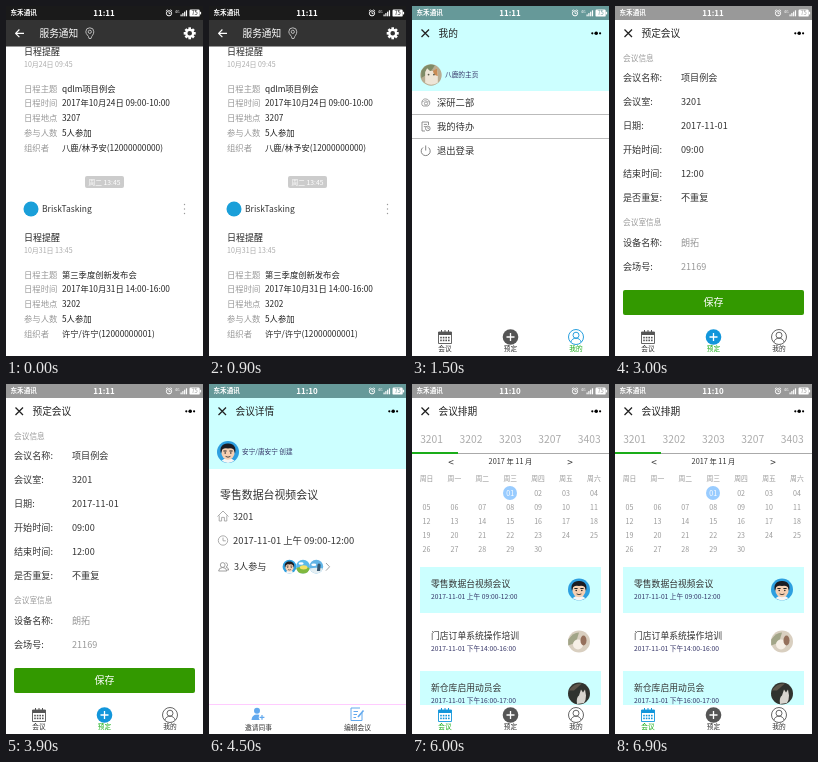
Animation of 197x350 px, one loop 7.5 s. Source, as an HTML page:

```html
<!DOCTYPE html>
<html lang="zh-CN">
<head>
<meta charset="utf-8">
<title>会议助手</title>
<style>
html, body { margin: 0; width: 100%; height: 100%; overflow: hidden; background: #fff; }
svg { display: block; width: 100%; height: 100%; }
text { font-family: "Noto Sans CJK SC", "Noto Sans CJK JP", "Noto Sans CJK", "Noto Sans", sans-serif; white-space: pre; }
</style>
</head>
<body>
<svg id="stage" viewBox="0 0 197 350" xmlns="http://www.w3.org/2000/svg"></svg>
<script>
const SCENE_MS = 1500;
const CYAN = '#ccffff', BLUE = '#1296db', GREEN = '#1aad19', INK = '#333', GREY = '#999';

// Text is placed by the vertical middle of its line.
const text = (x, y, s, size = 9, fill = INK, weight = 400, anchor = 'start') =>
  `<text x="${x}" y="${(y + size * 0.37).toFixed(2)}" font-size="${size}" fill="${fill}" text-anchor="${anchor}" font-weight="${weight}">${s}</text>`;
const mid = (x, y, s, size, fill, weight) => text(x, y, s, size, fill, weight, 'middle');
const rect = (x, y, w, h, fill, rx = 0) =>
  `<rect x="${x}" y="${y}" width="${w}" height="${h}" fill="${fill}" rx="${rx}"/>`;
const disc = (x, y, r, fill) => `<circle cx="${x}" cy="${y}" r="${r}" fill="${fill}"/>`;
const oval = (x, y, rx, ry, fill) => `<ellipse cx="${x}" cy="${y}" rx="${rx}" ry="${ry}" fill="${fill}"/>`;
const ring = (x, y, r, color, w = 0.8) =>
  `<circle cx="${x}" cy="${y}" r="${r}" fill="none" stroke="${color}" stroke-width="${w}"/>`;
const line = (d, color, w = 0.8) =>
  `<path d="${d}" fill="none" stroke="${color}" stroke-width="${w}" stroke-linejoin="round"/>`;
const shape = (d, fill) => `<path d="${d}" fill="${fill}"/>`;
const at = (x, y, body, scale = 1) => `<g transform="translate(${x} ${y}) scale(${scale})">${body}</g>`;

function statusBar(bg, time) {
  const bars = [0, 1, 2, 3].map(i => rect(174.5 + i * 1.8, 8.5 - i * 1.4, 1.2, 1.8 + i * 1.4, '#fff')).join('');
  return rect(0, 0, 197, 14, bg)
    + text(4.5, 7, '东禾通讯', 6.6, '#fff', 700)
    + mid(98, 7, time, 8, '#fff', 700)
    + ring(163, 7.3, 2.6, '#fff', 1) + line('M163 5.6V7.5H164.4M159.9 5l1.5-1.4M166.1 5l-1.5-1.4', '#fff')
    + text(169, 5.2, '4G', 3.8, '#fff', 500) + bars
    + rect(183.5, 3.6, 10.2, 7, '#fff', 1.2) + rect(193.7, 5.8, 1.4, 2.6, '#fff')
    + mid(188.6, 7.1, '75', 5.8, bg, 500);
}

function pageHead(title, time, bg, height = 27) {
  return rect(0, 14, 197, height, bg)
    + statusBar(bg === CYAN ? '#669999' : '#999', time)
    + line('M9.5 23.5l7.5 7.5M17 23.5l-7.5 7.5', '#222', 1.3)
    + text(26.5, 27.4, title, 9.7, '#222', 500)
    + disc(180.3, 27.3, 1.1, '#000') + disc(184.2, 27.3, 1.8, '#000') + disc(188.1, 27.3, 1.1, '#000');
}

const calendarIcon = (x, y, c) => {
  let cells = '';
  for (let r = 0; r < 2; r++)
    for (let k = 0; k < 4; k++) cells += rect(-4.8 + k * 2.6, -0.2 + r * 2.8, 1.6, 1.6, c);
  return at(x, y, line('M-6.5-5H6.5V6.5H-6.5Z', c, 0.9) + rect(-6.5, -5, 13, 3, c)
    + line('M-3.5-7V-4M0-7V-4M3.5-7V-4', c, 1) + cells);
};
const plusIcon = (x, y, c) => disc(x, y, 7.8, c) + line(`M${x - 4} ${y}h8M${x} ${y - 4}v8`, '#fff', 1.3);
const userIcon = (x, y, c) => at(x, y, ring(0, 0, 7.5, c, 0.9) + ring(0, -1.8, 3, c, 0.9)
  + line('M-5.2 5.2C-4.5 2.3-2.2 1.2 0 1.2S4.5 2.3 5.2 5.2', c, 0.9));

function tabBar(active) {
  const icons = [calendarIcon, plusIcon, userIcon];
  return rect(0, 321, 197, 29, '#fff') + ['会议', '预定', '我的'].map((label, i) => {
    const x = 33 + i * 65.5, on = i === active;
    return icons[i](x, 331, on ? BLUE : '#555') + mid(x, 343, label, 6.7, on ? GREEN : INK, 500);
  }).join('');
}

// Avatars are drawn in a circle of radius 11.
const boy = (x, y, r) => at(x, y, disc(0, 0, 11, '#2d9fe0')
  + shape('M-6.5 8.8Q-4 6 0 6T6.5 8.8Q0 13-6.5 8.8Z', '#f6f6f6')
  + oval(0, 0.8, 6.6, 7, '#f5cfb2')
  + shape('M-7 1.5C-9-5-5-8.8 0-8.4C5-8.8 9-5 7 1.5L5.8-2.5Q3-4.6 0-3.4Q-3-4.6-5.8-2.5Z', '#1c1c22')
  + line('M-4.6-1h3.2M1.4-1h3.2', '#222', 1.1) + disc(-2.8, 1, 0.8, '#222') + disc(2.8, 1, 0.8, '#222')
  + line('M-2.4 4.4Q0 6 2.4 4.4', '#222', 0.8), r / 11);
const catPhoto = (x, y, r) => at(x, y, disc(0, 0, 11, '#b8ac91')
  + shape('M-10-4Q-5-13 4-10Q0-2-10 3Z', '#7f8b67')
  + shape('M-6 8V-3L-4-7L-1-4H3L6-7L7 0V8Q0 12-6 8Z', '#eee5d7')
  + shape('M2-4L6-7L7 1Q3 1 2-4Z', '#c98b54')
  + disc(-2.5, -.5, .9, '#554') + disc(3, -.5, .9, '#554'), r / 11);
const meadow = (x, y, r) => at(x, y, disc(0, 0, 11, '#5ab9ea')
  + shape('M-10.8 2Q0-3 10.8 2A11 11 0 0 1-10.8 2Z', '#80b83e')
  + oval(1, 1, 6, 3.5, '#f5e164') + oval(-3, -5, 4, 2, '#fff'), r / 11);
const shore = (x, y, r) => at(x, y, disc(0, 0, 11, '#62b4e6')
  + shape('M-10.5 3Q0 0 10.5 3A11 11 0 0 1-10.5 3Z', '#e4eef2')
  + shape('M1 7L2-3Q4-7 7-3L6 7Z', '#35566f') + oval(-4, -3, 4, 2, '#fff'), r / 11);
const beigePhoto = (x, y, r) => at(x, y, disc(0, 0, 11, '#d9cfc0')
  + shape('M-10.8-2Q-6-9 0-9L-3 1L-10.8 4Z', '#a2a588')
  + oval(-1, 3, 5, 5, '#f6efe6') + oval(4.5, -1, 3, 5, '#95705c'), r / 11);
const darkPhoto = (x, y, r) => at(x, y, disc(0, 0, 11, '#30332f')
  + shape('M-2 10.5Q-3 4 0 2L2-4L4-1L6-4L7 2Q7 7 5 9.6Z', '#d8d5cf')
  + shape('M-10-3Q-5-11 3-10L-5-3Z', '#5d554a'), r / 11);

function notice(top, date, values) {
  const labels = ['日程主题', '日程时间', '日程地点', '参与人数', '组织者'];
  return text(18, top, '日程提醒', 9, '#222', 500) + text(18, top + 12, date, 7, '#aaa')
    + labels.map((label, i) => {
      const y = top + 36.5 + i * 14.85;
      return text(18, y, label, 8.35, GREY) + text(56, y, values[i], 8.3, '#222', 500);
    }).join('');
}

function gear(x, y) {
  let teeth = '';
  for (let a = 0; a < 360; a += 45) teeth += `<rect x="-1.3" y="-6" width="2.6" height="3" fill="#fff" transform="rotate(${a})"/>`;
  return at(x, y, teeth + ring(0, 0, 3.4, '#fff', 2.2));
}

function notices() {
  return notice(46, '10月24日 09:45', ['qdlm项目例会', '2017年10月24日 09:00-10:00', '3207', '5人参加', '八鹿/林予安(12000000000)'])
    + rect(79, 170, 39, 12, '#ccc', 2) + mid(98.5, 176, '周二 13:45', 6.8, '#fff')
    + disc(25, 203, 7.5, '#1a9fd9') + text(36, 203, 'BriskTasking', 8.5, INK)
    + [198.5, 203, 207.5].map(y => disc(178.5, y, 0.7, '#999')).join('')
    + notice(232, '10月31日 13:45', ['第三季度创新发布会', '2017年10月31日 14:00-16:00', '3202', '5人参加', '许宁/许宁(12000000001)'])
    + rect(0, 14, 197, 26.5, '#333') + statusBar('#1a1a1a', '11:11')
    + line('M18 27.3H9.8M13.4 23.5L9.6 27.3L13.4 31.1', '#fff', 1.2)
    + text(33.5, 27.3, '服务通知', 9.7, '#fff')
    + line('M83 32.5C83 29.5 79.8 28.5 79.8 25.8A4 4 0 0 1 87.8 25.8C87.8 29 85.5 29.5 85 32.5Z', '#bbb', 1)
    + ring(83.8, 25.8, 1.6, '#bbb', 1) + gear(183.7, 27.3);
}

function profile() {
  const icons = [
    line('M10 99C9 94 12 92.5 14 93C18 93.5 19 98 16 100H11Z', '#888') + ring(14, 97.5, 1.6, '#888') + line('M10 96Q13 93 17 96', '#888', 0.6),
    line('M10 116H16.5V119M13 125H10V116M11.8 118.4H15M11.8 120.6H13.8', '#777') + ring(15.8, 122.4, 2.3, '#777') + line('M15.8 121V122.6H17', '#777', 0.6),
    line('M11 141.5A4.5 4.5 0 1 0 16.4 141.5M13.7 139.5V144.5', '#777', 0.9),
  ];
  return pageHead('我的', '11:11', CYAN, 71)
    + catPhoto(19, 69, 10.7) + text(33, 68.2, '八鹿的主页', 6.7, '#336')
    + ['深研二部', '我的待办', '退出登录'].map((s, i) => icons[i] + text(25, 96.8 + i * 24, s, 9.3)).join('')
    + rect(0, 108, 197, 1, '#bbb') + rect(0, 132, 197, 1, '#bbb')
    + tabBar(2);
}

function booking() {
  const rows = [['会议名称', '项目例会'], ['会议室', '3201'], ['日期', '2017-11-01'],
    ['开始时间', '09:00'], ['结束时间', '12:00'], ['是否重复', '不重复']];
  const room = [['设备名称', '朗拓'], ['会场号', '21169']];
  const list = (items, top, color) => items.map(([label, value], i) =>
    text(8, top + i * 24, label + ':', 9.1) + text(66, top + i * 24, value, 9.1, color)).join('');
  return pageHead('预定会议', '11:11', '#fff')
    + text(8, 52, '会议信息', 7.7, GREY) + list(rows, 72, INK)
    + text(8, 216.5, '会议室信息', 7.7, GREY) + list(room, 237, GREY)
    + rect(8, 284, 181, 25, '#339900', 2) + mid(98.5, 296.2, '保存', 10, '#fff')
    + tabBar(1);
}

function details() {
  return pageHead('会议详情', '11:10', CYAN, 71)
    + boy(19, 68, 11) + text(33, 68, '安宁/唐安宁 创建', 6.65, '#336')
    + text(11, 111.3, '零售数据台视频会议', 10.9)
    + line('M8.5 132.5L14 127L19.5 132.5M10.2 131.5V137H12.6V133.4H15.4V137H17.8V131.5', GREY)
    + text(24, 132.3, '3201', 9.1)
    + ring(14, 156.5, 4.7, GREY) + line('M14 153.6V156.8H16.8', GREY)
    + text(24, 156.2, '2017-11-01 上午 09:00-12:00', 9.4)
    + ring(13.7, 181, 2.4, '#888') + line('M9.6 187Q10 183.5 13.7 183.5T17.8 187ZM16.5 178.7A2.2 2.2 0 0 1 17 183Q19.4 183.6 19.7 186H18', '#888')
    + text(25, 182.3, '3人参与', 9.1)
    + boy(80.5, 182.7, 6.9) + meadow(94, 182.7, 6.9) + shore(107.3, 182.7, 6.9)
    + line('M117 179L120.6 182.8L117 186.6', '#888')
    + rect(0, 320, 197, 1, '#ffccff')
    + disc(48, 326.8, 3, '#62a9ee') + shape('M42.5 336Q43 330.5 48 330.5T53.5 336Z', '#62a9ee')
    + disc(53, 333.3, 3.2, '#fff') + line('M50.6 333.3h4.8M53 330.9v4.8', '#62a9ee', 1.2)
    + line('M153 329V336.5H142V324H151M144.5 327.5H149M144.5 330.5H148M144.5 333.5H147', '#62a9ee', 1)
    + line('M149 333L154.5 326.5', '#62a9ee', 1.6)
    + mid(49.5, 343, '邀请同事', 6.8, INK, 500) + mid(148.5, 343, '编辑会议', 6.8, INK, 500);
}

function calendar() {
  let days = disc(98, 109, 7, '#99ccff');
  for (let d = 1; d <= 30; d++) {
    const cell = d + 2;
    days += mid(14.5 + cell % 7 * 27.9, 109 + Math.floor(cell / 7) * 14, String(d).padStart(2, '0'), 7.1, d === 1 ? '#fff' : GREY);
  }
  return mid(39, 78, '&lt;', 10, INK) + mid(158, 78, '&gt;', 10, INK)
    + mid(98.5, 77.5, '2017 年 11 月', 7.3, INK, 500)
    + [...'日一二三四五六'].map((d, i) => mid(14.5 + i * 27.9, 94, '周' + d, 6.8, GREY)).join('') + days;
}

function schedule() {
  const meetings = [
    ['零售数据台视频会议', '上午 09:00-12:00', boy, CYAN],
    ['门店订单系统操作培训', '下午14:00-16:00', beigePhoto, '#fff'],
    ['新仓库启用动员会', '下午16:00-17:00', darkPhoto, CYAN],
  ];
  return pageHead('会议排期', '11:10', '#fff')
    + [3201, 3202, 3203, 3207, 3403].map((n, i) => mid(19.6 + i * 39.4, 55, n, 10.3, '#aaa')).join('')
    + rect(0, 69, 197, 1, '#aaa') + rect(0, 68, 46, 2, GREEN)
    + calendar()
    + meetings.map(([name, time, avatar, bg], i) => {
      const y = 183 + i * 52;
      return rect(8, y, 181, 46, bg) + text(19, y + 17, name, 8.8)
        + text(19, y + 29.5, '2017-11-01 ' + time, 6.7, '#336', 500) + avatar(167, y + 22.5, 11);
    }).join('')
    + tabBar(0);
}

const scenes = [notices, profile, booking, details, schedule];
const stage = document.getElementById('stage');
let shown = -1;

function draw(now) {
  const index = Math.floor(now / SCENE_MS) % scenes.length;
  if (index !== shown) {
    shown = index;
    stage.innerHTML = rect(0, 0, 197, 350, '#fff') + scenes[index]();
  }
}

const start = performance.now();
function tick() {
  draw(performance.now() - start);
  requestAnimationFrame(tick);
}
tick();
</script>
</body>
</html>
```
